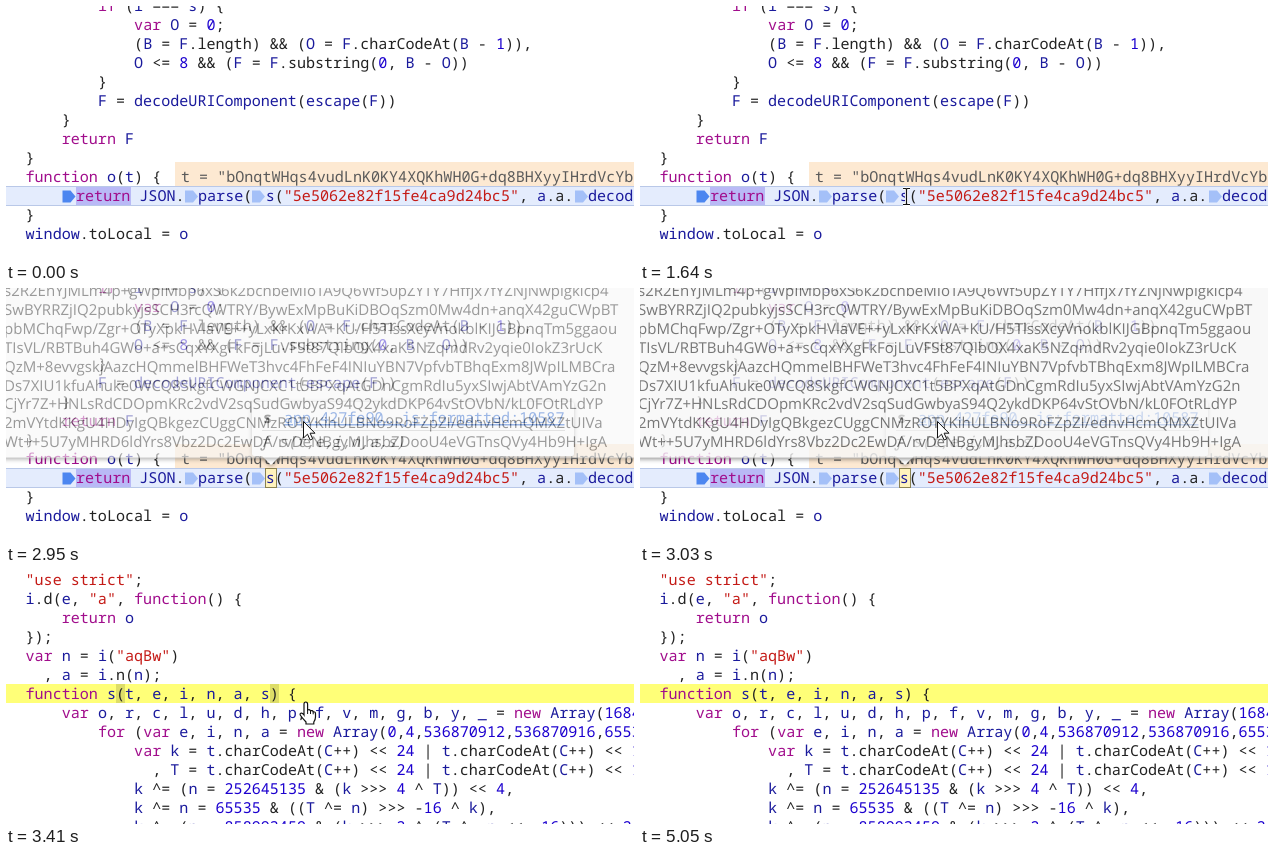
An HTML page that plays this animation: 628x254 px, repeating every 5140 ms.

```html
<!DOCTYPE html>
<html lang="en">
<head>
<meta charset="utf-8">
<title>Stepping into a function</title>
<style>
html, body { margin: 0; width: 100%; height: 100%; overflow: hidden; background: #fff; }
svg { display: block; width: 628px; height: 254px; }
text { white-space: pre; text-rendering: geometricPrecision; fill: #222;
  font: 15.08px "Noto Sans Mono", "DejaVu Sans Mono", monospace; }
.keyword { fill: #a10d8c; }
.number { fill: #1c00cf; }
.string { fill: #c41a16; }
.name { fill: #1a1a9c; }
.hint { fill: #5a5a5a; }
.link { fill: #1155cc; text-decoration: underline; }
.popup { filter: drop-shadow(0 1px 2px #0007); }
.tip text { font: 15px "Open Sans", "Noto Sans", sans-serif; fill: #565656; }
</style>
</head>
<body>
<svg id="stage" viewBox="0 0 628 254"></svg>
<script>
const LOOP = 5140, CELL = 9.05, LEFT = 19.5;

const caller = [
  [8, 5, 'if (i === s) {'],
  [12, 24, 'var O = 0;'],
  [12, 43, '(B = F.length) && (O = F.charCodeAt(B - 1)),'],
  [12, 62, 'O <= 8 && (F = F.substring(0, B - O))'],
  [8, 81, '}'],
  [8, 100, 'F = decodeURIComponent(escape(F))'],
  [4, 119, '}'],
  [4, 138, 'return F'],
  [0, 157, '}'],
  [0, 176, 'function o(t) {'],
  [0, 214, '}'],
  [0, 233, 'window.toLocal = o']
];

const callee = [
  [0, '"use strict";'],
  [0, 'i.d(e, "a", function() {'],
  [4, 'return o'],
  [0, '});'],
  [0, 'var n = i("aqBw")'],
  [2, ', a = i.n(n);'],
  [0, 'function s(t, e, i, n, a, s) {'],
  [4, 'var o, r, c, l, u, d, h, p, f, v, m, g, b, y, _ = new Array(16843776'],
  [8, 'for (var e, i, n, a = new Array(0,4,536870912,536870916,65536'],
  [12, 'var k = t.charCodeAt(C++) << 24 | t.charCodeAt(C++) << 16'],
  [12, '  , T = t.charCodeAt(C++) << 24 | t.charCodeAt(C++) << 16'],
  [12, 'k ^= (n = 252645135 & (k >>> 4 ^ T)) << 4,'],
  [12, 'k ^= n = 65535 & ((T ^= n) >>> -16 ^ k),'],
  [12, 'k ^= (n = 858993459 & (k >>> 2 ^ (T ^= n << -16))) << 2,']
].map(([indent, code], row) => [indent, 15 + 19 * row, code]);

const tipRows = [
  's2R2EnYJMLm4p+gWpIMbp6xS6k2bcnbeMIoTA9Q6Wf50pZYTY7Hffjx7fYZNjNwpigkicp4',
  'SwBYRRZjIQ2pubkyjsSCH3rcQWTRY/BywExMpBuKiDBOqSzm0Mw4dn+anqX42guCWpBT',
  'pbMChqFwp/Zgr+OTyXpkHVlaVE++yLxKrKxWA+KU/H5TlssXcyVnokblKIJGBpnqTm5ggaou',
  'TIsVL/RBTBuh4GWo+a+sCqxYXgFkFojLuVFSt87QIbOX4xaK5NZqmdRv2yqie0IokZ3rUcK',
  'QzM+8evvgskjAazcHQmmelBHFWeT3hvc4FhFeF4INIuYBN7VpfvbTBhqExm8JWpILMBCra',
  'Ds7XIU1kfuAhuke0WCQ8SkgfCWGNJCXC1t5BPXqAtGDnCgmRdIu5yxSIwjAbtVAmYzG2n',
  'CjYr7Z+HNLsRdCDOpmKRc2vdV2sqSudGwbyaS94Q2ykdDKP64vStOVbN/kL0FOtRLdYP',
  '2mVYtdKKgU4HDyIgQBkgezCUggCNMzROTYKihULBNo9RoFZpZI/ednvHcmQMXZtUIVa',
  'Wt++5U7yMHRD6ldYrs8Vbz2Dc2EwDA/rvDeNBgyMJhsbZDooU4eVGTnsQVy4Hb9H+IgA'
];

// [start ms, shape, x, y]; shape '' hides the pointer
const pointerSteps = [
  [0, '', 0, 0],
  [70, 'beam', 227, 241], [124, 'beam', 218, 234], [178, 'beam', 202, 225],
  [232, 'beam', 183, 216], [286, 'beam', 167, 209], [340, 'beam', 157, 205],
  [490, 'beam', 160, 207], [568, 'beam', 175, 208], [647, 'beam', 200, 205],
  [725, 'beam', 230, 199], [803, 'beam', 250, 195], [882, 'beam', 260, 199],
  [960, 'beam', 252, 207],
  [1140, 'beam', 257, 202], [1207, 'beam', 264, 194], [1273, 'beam', 271, 188],
  [1340, 'beam', 273, 187],
  [1560, 'beam', 270, 189], [1640, 'beam', 266.5, 190.5],
  [2400, 'beam', 291, 163], [2480, 'beam', 293, 157], [2560, 'beam', 295, 150],
  [2640, 'arrow', 297, 142], [2720, 'arrow', 297, 139],
  [2950, 'arrow', 297, 133], [3190, 'hand', 293, 131],
  [3730, 'beam', 278, 135], [3807, 'beam', 256, 146], [3883, 'beam', 261, 169],
  [3960, 'beam', 295, 195], [4037, 'beam', 350, 218], [4113, 'beam', 415, 236],
  [4190, 'beam', 467.5, 249],
  [4270, '', 0, 0]
];

const tipSteps = [[0, 0], [2870, .35], [2950, .6], [3030, .8], [3110, .5], [3190, .25], [3260, 0]];

const escapeText = s => s.replace(/&/g, '&amp;').replace(/</g, '&lt;');
const rect = (x, y, w, h, fill, more = '') =>
  `<rect x="${x}" y="${y}" width="${w}" height="${h}" fill="${fill}" ${more}/>`;
const label = (x, y, s, more = '') => `<text x="${x}" y="${y}" ${more}>${escapeText(s)}</text>`;

function tokenClass(token) {
  if (token[0] === '"') return 'string';
  if (/^\d/.test(token)) return 'number';
  if (/^(var|if|for|new|return|function)$/.test(token)) return 'keyword';
  return /^\w/.test(token) ? 'name' : '';
}

function code(x, y, source) {
  const spans = source.match(/"[^"]*"|\.\w+|\w+|[^\w".]+|\./g)
    .map(t => `<tspan class="${tokenClass(t)}">${escapeText(t)}</tspan>`);
  return `<text x="${x}" y="${y}">${spans.join('')}</text>`;
}

const listing = lines => lines.map(([indent, y, s]) => code(LEFT + indent * CELL, y, s)).join('');
const marker = (x, fill) => `<path d="M${x} 184.500h8l5 6-5 6h-8z" fill="${fill}"/>`;

const callerView = listing(caller)
  + rect(169, 156, 459, 25, '#fde9d2') + label(175, 176, 't = "bOnqtWHqs4vudLnK0KY4XQKhWH0G+dq8BHXyyIHrdVcYb', 'class="hint"')
  + rect(0, 180, 628, 20, '#b9c8e8') + rect(0, 181, 628, 18, '#e4ecfd')
  + rect(70, 181, 55, 18, '#b9b9f6')
  + marker(56.5, '#4c86f0') + [179, 246, 569].map(x => marker(x, '#a4c0f8')).join('')
  + `<g id="callName">${rect(259.5, 180.5, 11, 19, '#fff3bd', 'stroke="#8b8252"')}</g>`
  + code(70, 195, 'return JSON.') + code(192, 195, 'parse(')
  + code(259.7, 195, 's("5e5062e82f15fe4ca9d24bc5", a.a.') + code(582, 195, 'decod');

const popup = `<path class="popup" fill="#fff" d="M248 114H566q2 0 2 2V166q0 2-2 2H274l-9 9-9-9H248q-2 0-2-2V116q0-2 2-2z"/>`
  + label(257, 135, 's', 'font-weight="700" style="font-weight:700"')
  + label(278, 135, 'app.427fe90….js:formatted:10587', 'class="link"')
  + rect(256, 142, 303, 1, '#c4c4c4')
  + label(254, 159, 'ƒ', 'style="font-style:italic"')
  + label(272.5, 159, 's(t,e,i,n,a,s)', 'style="font-style:italic"');

const tip = rect(-5, -5, 640, 175, '#f7f7f7', 'stroke="#aaa" class="popup"')
  + tipRows.map((s, i) => label(-2, 8 + i * 18.9, s)).join('');

const brackets = [110, 264].map(x => rect(x, 114, 9, 19, '#0002')).join('');
const calleeView = rect(0, 114, 628, 19, '#ffff78')
  + `<g id="brackets">${brackets}</g>` + listing(callee);

const pointers = {
  beam: `<path d="M-3.500-8H-1Q0-8 0-7V7Q0 8-1 8H-3.500M3.500-8H1Q0-8 0-7V7Q0 8 1 8H3.500" fill="none" stroke="#fff" stroke-width="3"/>
    <path d="M-3.500-8H-1Q0-8 0-7V7Q0 8-1 8H-3.500M3.500-8H1Q0-8 0-7V7Q0 8 1 8H3.500" fill="none" stroke="#111" stroke-width="1.200"/>`,
  arrow: `<path d="M.5.500V17l4-3.800 2.600 5.800 2.600-1.200-2.600-5.600H12z" fill="#fff" stroke="#111"/>`,
  hand: `<path d="M5 14V3.200Q5 1 6.800 1T8.600 3.200V9Q10.500 8 11.500 9.800 13.500 9 14.200 10.800 16.500 10.500 16.500 12.800V16Q16.500 18.500 14.800 21V23H7V21Q4 18 1.200 14 .8 12 2.500 12 4 12.500 5 14z" fill="#fff" stroke="#111" stroke-width="1.200"/>
    <path d="M8.600 9v4M11.500 9.800v3.200M14.200 10.800v2.500" stroke="#111" fill="none"/>`
};

document.getElementById('stage').innerHTML =
  `<g id="caller">${callerView}<g id="popup">${popup}</g><g id="tip" class="tip">${tip}</g></g>
   <g id="callee">${calleeView}</g>`
  + Object.entries(pointers).map(([id, shape]) => `<g id="${id}">${shape}</g>`).join('');

const part = id => document.getElementById(id);
const show = (id, on) => { part(id).style.display = on ? '' : 'none'; };
const stepAt = (steps, t) => steps.findLast(step => step[0] <= t);

function draw(t) {
  const jumped = t >= 3410;
  show('caller', !jumped);
  show('callee', jumped);
  show('brackets', t < 5050);
  show('popup', t >= 1940);
  show('callName', t >= 1940);
  part('tip').style.opacity = stepAt(tipSteps, t)[1];

  const [, shape, x, y] = stepAt(pointerSteps, t);
  for (const id in pointers) show(id, id === shape);
  if (shape) part(shape).setAttribute('transform', `translate(${x} ${y})`);
}

const start = performance.now();
function tick(now) {
  draw(Math.max(0, now - start) % LOOP);
  requestAnimationFrame(tick);
}
draw(0);
requestAnimationFrame(tick);
</script>
</body>
</html>
```
